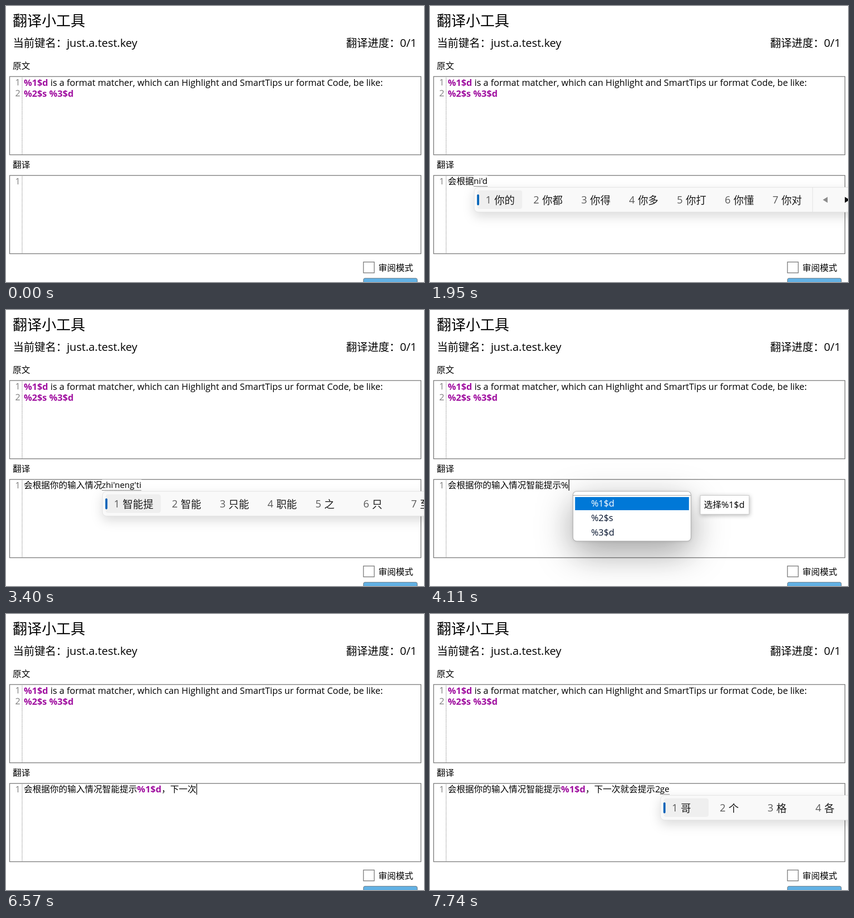
Recreate the animation shown at these times as an HTML page. Size 921 by 608 pixels, loop 8 s.

```html
<!DOCTYPE html>
<html lang="zh-CN">
<head>
<meta charset="utf-8">
<style>
html, body { margin: 0; width: 100%; height: 100%; overflow: hidden; background: #fff; }
svg { display: block; font: 19.85px "Open Sans", "Noto Sans CJK SC", "Noto Sans CJK", sans-serif; }
text { white-space: pre; }
.cjk { font-size: .968em; }
.code { font-weight: 700; font-size: 1.01em; fill: #a010a0; }
.num { fill: #808080; text-anchor: end; }
.box { fill: none; stroke: #7c7c7c; stroke-width: 1.6; }
.dots { stroke: #777; stroke-width: 1.2; stroke-dasharray: 1.2 1.2; }
#panel { filter: drop-shadow(0 9px 12px rgba(0, 0, 0, .14)); }
#popup .menu { filter: drop-shadow(0 25px 40px rgba(0, 0, 0, .34)) drop-shadow(0 1px 3px rgba(0, 0, 0, .15)); }
#tip rect { filter: drop-shadow(1px 2px 5px rgba(0, 0, 0, .28)); }
</style>
</head>
<body>
<svg width="921" height="608" viewBox="0 0 921 608">
  <g id="page"></g>
  <text id="text" x="39.2" y="392.8"></text>
  <rect id="caret" y="374" width="1.4" height="24"/>
  <g id="comp">
    <rect y="373.4" height="24" fill="#fff"/>
    <text y="392" font-size="18.5"></text>
    <path stroke="#222" stroke-width="1.2" stroke-dasharray="1.2 1.2"/>
  </g>
  <g id="panel"></g>
  <g id="popup"></g>
  <g id="tip"></g>
</svg>
<script>
const $ = id => document.getElementById(id);
const clamp = v => Math.max(0, Math.min(1, v));

// Sizes Chinese runs; rich() also marks format codes.
const plain = s => s.replace(/[\u3000-\uffef]+/g, '<tspan class="cjk">$&</tspan>');
const rich = s => plain(s.replace(/%\d\$\w/g, '<tspan class="code">$&</tspan>'));
const label = (x, y, s, attr = '') => `<text x="${x}" y="${y}" ${attr}>${s}</text>`;
const rect = (x, y, w, h, attr) => `<rect x="${x}" y="${y}" width="${w}" height="${h}" ${attr}/>`;

const editor = (y, lines) =>
  rect(8, y, 906.3, 172.3, 'class="box"') +
  `<path class="dots" d="M35.5 ${y + 2}V${y + 171}"/>` +
  Array.from({ length: lines }, (_, i) => label(31.7, y + 20 + 24 * i, i + 1, 'class="num"')).join('');

$('page').innerHTML =
  label(14.8, 43.8, rich('翻译小工具'), 'font-size="33"') +
  label(15.4, 89.5, rich('当前键名：just.a.test.key'), 'font-size="24.5"') +
  label(749.6, 89.5, rich('翻译进度：0/1'), 'font-size="24.5"') +
  label(14.7, 138.5, rich('原文')) + label(14.7, 356.8, rich('翻译')) +
  editor(155.4, 2) + editor(373.3, 1) +
  label(39.2, 175.6, rich('%1$d is a format matcher, which can Highlight and SmartTips ur format Code, be like:')) +
  label(39.2, 199.6, rich('%2$s %3$d')) +
  rect(787.6, 564, 23.8, 23.8, 'class="box"') +
  label(820.5, 583.8, rich('审阅模式')) +
  rect(787.6, 599.6, 118.6, 30, 'rx="4" fill="#62b1e4" stroke="#7b868e" stroke-width="1.4"');

$('popup').innerHTML =
  rect(315, 399.5, 260, 109.5, 'class="menu" rx="8" fill="#fff"') +
  rect(315, 399.5, 260, 109.5, 'rx="8" fill="#fff" stroke="#ababab" stroke-width="1.2"') +
  '<path d="M315 408.3H575" stroke="#a6a6a6" stroke-width="1.3"/>' +
  rect(319.6, 412, 251, 29, 'fill="#0078d7"') +
  ['%1$d', '%2$s', '%3$d'].map((s, i) => label(355, 432.6 + 32 * i, s, `fill="${i ? '#06142e' : '#fff'}"`)).join('');
$('tip').innerHTML =
  rect(595.5, 408.5, 107.5, 41.5, 'fill="#fff" stroke="#c4c4c4"') +
  label(603.5, 435.8, plain('选择%1$d'));

// One typed word: text before it, pinyin keys, key times, commit time, result, candidates by key count.
const even = (start, step, n) => Array.from({ length: n }, (_, i) => start + step * i);
const words = [
  { before: '', keys: "hui'gen'ju", times: [920, 975, 1030, 1090, 1190, 1240, 1330, 1420], end: 1510,
    word: '会根据', tail: '会跟 会根 回跟 会 回 辉',
    list: { 1: '和 好 会 还 很 后 或', 2: '胡 湖 护 户 呼 虎 互', 3: '会 回 辉 灰 惠 汇 挥',
      4: '会给 会过 会搞 回国 会更 回归 回顾', 5: '回个 辉哥 会歌 晖哥 挥戈 会个 灰哥' } },
  { before: '会根据', keys: "ni'de'shu'ru'qing'ku", times: [1650, 1700, 1950, ...even(2090, 65, 12)], end: 2870,
    word: '你的输入情况', tail: '你的 你得 你德 你 呢 泥',
    list: { 1: '你 年 那 能 呢 女 内', 2: '你 呢 泥 尼 拟 逆 妮', 3: '你的 你都 你得 你多 你打 你懂 你对' } },
  { before: '会根据你的输入情况', keys: "zhi'neng'ti'shi", times: even(2970, 52.3, 13), end: 3650,
    word: '智能提示', tail: '智能 只能 职能 之 只 至', list: { 1: '在 做 再 中 这 最 之' } },
  { before: '会根据你的输入情况智能提示%1$d，', keys: "xia'yi'ci", times: even(6140, 46.6, 7), end: 6570,
    word: '下一次', tail: '下一 下衣 夏衣 下 夏 吓', list: { 1: '下 想 向 学 小 行 新' } },
  { before: '会根据你的输入情况智能提示%1$d，下一次', keys: "jiu'hui", times: even(6680, 86.6, 6), end: 7200,
    word: '就会', tail: '酒会 就回 就 九 久 旧', list: { 1: '就 将 及 几 家 经 见' } },
  { before: '会根据你的输入情况智能提示%1$d，下一次就会', keys: "ti'shi", times: even(7350, 55.7, 5), end: 7628,
    word: '提示', tail: '提 题 体 替 梯 踢', list: { 1: '他 她 它 太 天 听 同' } },
  { before: '会根据你的输入情况智能提示%1$d，下一次就会提示2', keys: 'ge', times: [7685, 7740], end: 8000,
    word: '个', tail: '', list: { 1: '个 给 过 跟 更 国 高', 2: '哥 个 格 各 歌 隔 革' } },
];

// Text outside the composition, from each time on.
const committed = [
  [0, ''], ...words.map(w => [w.end, w.before + w.word]),
  [3950, '会根据你的输入情况智能提示%'],
  [4290, '会根据你的输入情况智能提示%1$d'],
  [5920, '会根据你的输入情况智能提示%1$d，'],
  [7628, '会根据你的输入情况智能提示%1$d，下一次就会提示2'],
].sort((a, b) => a[0] - b[0]);
const caretOff = [[0, 50], [620, 920], [4590, 4840], [5140, 5470], [5760, 5920]];

function typed(keys, count) {
  let i = 0;
  while (count) if (keys[i++] !== "'") count--;
  return keys.slice(0, i);
}

function candidates(w, count, pinyin) {
  if (w.list[count]) return w.list[count].split(' ');
  const head = w.word.slice(0, pinyin.split("'").length);
  return [head, ...w.tail.split(' ').filter(s => s !== head)];
}

function panel(x, cands) {
  let out = '', left = 7;
  cands.forEach((s, i) => {
    const w = Math.max(105.4, 60.4 + 22.5 * s.length);
    if (!i) out += rect(left, 406, w - 6.4, 41, 'rx="5" fill="#efefef"') +
      rect(left - 0.6, 415, 4.6, 24, 'rx="2.3" fill="#0062b8"');
    out += label(left + 18.2, 435.4, i + 1, 'font-size="22.4" fill="#5a5a5a"') +
      label(left + 37.6, 436, plain(s), 'font-size="23.3" fill="#1c1c1c"');
    left += w;
  });
  const sep = left + 1;
  const line = d => `<path d="M${sep + d} 400V454" stroke="#e2e2e2" stroke-width="1.2"/>`;
  out += line(0) + line(104) +
    `<path d="M${sep + 33} 420.5v13l-10.5 -6.5z" fill="#8c8c8c"/>` +
    `<path d="M${sep + 71} 420.5v13l10.5 -6.5z" fill="#111"/>` +
    rect(sep + 121, 416, 21, 21, 'rx="5" fill="none" stroke="#222" stroke-width="1.8"') +
    `<path d="M${sep + 136} 427l-6.5 -6.5a4 4 0 0 1 6.5 -4.5a4 4 0 0 1 6.5 4.5z" fill="#111"/>`;
  return `<g transform="translate(${x + 0.8} 0)">` +
    rect(0, 399.5, sep + 168, 54.5, 'rx="9" fill="#f9f9f9" stroke="#e0e0e0"') + out + '</g>';
}

const show = (el, opacity) => {
  el.style.display = opacity > 0 ? '' : 'none';
  el.style.opacity = opacity;
};

function draw(t) {
  $('text').innerHTML = rich(committed.filter(c => c[0] <= t).pop()[1]);
  const end = 38.8 + $('text').getComputedTextLength();
  const w = words.find(w => t >= w.times[0] && t < w.end);

  show($('comp'), w ? 1 : 0);
  show($('panel'), w ? clamp(0.4 + (t - w.times[0]) / 80) : 0);
  show($('caret'), w || caretOff.some(([a, b]) => t >= a && t < b) ? 0 : 1);
  $('caret').setAttribute('x', end + 0.7);

  if (w) {
    const count = w.times.filter(k => k <= t).length;
    const pinyin = typed(w.keys, count);
    const [back, text, line] = $('comp').children;
    text.textContent = pinyin;
    text.setAttribute('x', end - 0.3);
    const width = text.getComputedTextLength();
    back.setAttribute('x', end);
    back.setAttribute('width', width);
    line.setAttribute('d', `M${end} 397.4h${width}`);
    $('panel').innerHTML = panel(end, candidates(w, count, pinyin));
  }

  const close = 1 - clamp((t - 4290) / 80);
  show($('popup'), clamp((t - 3930) / 120) * close);
  show($('tip'), clamp((t - 4050) / 60) * close);
}

function tick() {
  draw(performance.now() % 8000);
  requestAnimationFrame(tick);
}
tick();
</script>
</body>
</html>
```
